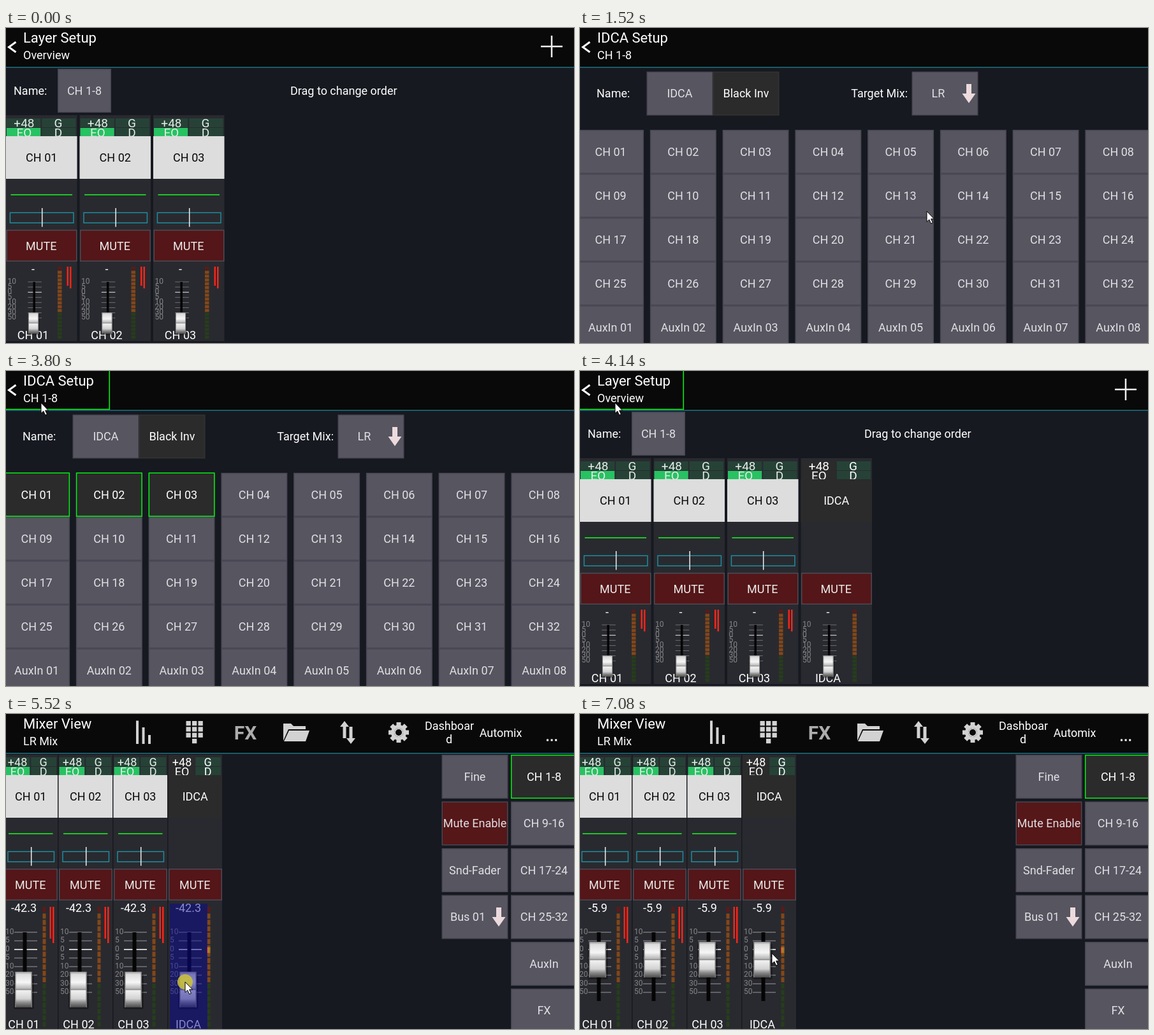
Write an HTML page that moves like this. It is 891x495 px and loops after 7.56 s.

```html
<!DOCTYPE html>
<html lang="en">
<head>
<meta charset="utf-8">
<title>Mixer layer setup</title>
<style>
  html, body { margin: 0; width: 100%; height: 100%; overflow: hidden; background: #161920; }
  svg { display: block; width: 891px; height: 495px; }
  text { font-family: Roboto, "Noto Sans", sans-serif; white-space: pre; }
</style>
</head>
<body>
<svg id="stage" viewBox="0 0 891 495" xmlns="http://www.w3.org/2000/svg"></svg>
<script>
const LOOP = 7560;
const GREEN = '#00f010', GREY = '#565560', EDGE = '#484753', DARK = '#2b2b2b';
const PALE = '#e0e0e4', ICON = '#d2d2d2';

// --- drawing helpers -------------------------------------------------
const rect = (x, y, w, h, fill, extra = '') =>
  `<rect x="${x}" y="${y}" width="${w}" height="${h}" fill="${fill}" ${extra}/>`;
const frame = (x, y, w, h, fill, stroke, sw = 1.5) =>
  rect(x + sw / 2, y + sw / 2, w - sw, h - sw, fill, `stroke="${stroke}" stroke-width="${sw}"`);
const path = (d, stroke, sw = 1, fill = 'none') =>
  `<path d="${d}" stroke="${stroke}" stroke-width="${sw}" fill="${fill}"/>`;
// y is the middle of the capitals
const text = (s, x, y, fill = '#fff', size = 18, anchor = 'middle', extra = '') =>
  `<text x="${x}" y="${y + size * 0.356}" font-size="${size}" fill="${fill}" text-anchor="${anchor}" ${extra}>${s}</text>`;
const group = (id, body, extra = '') => `<g id="${id}" ${extra}>${body}</g>`;
const range = n => [...Array(n).keys()];
const two = n => String(n).padStart(2, '0');

const button = (s, x, y, w, h, fill = GREY, color = PALE, dx = 0) =>
  frame(x, y, w, h, fill, fill === DARK ? '#333' : EDGE) + text(s, x + w / 2 + dx, y + h / 2, color);
const chosen = (s, x, y, w, h) =>
  frame(x, y, w, h, DARK, GREEN) + text(s, x + w / 2, y + h / 2);
const arrowDown = (x, y) =>
  `<path d="M${x - 4} ${y}h8v15h6.5L${x} ${y + 30}L${x - 10.5} ${y + 15}h6.5z" fill="#ecdadd"/>`;

const header = (title, sub, back) =>
  rect(0, 0, 891, 61, '#090909') + rect(0, 61, 891, 1.5, '#1b7080') +
  text(title, 27, 15.5, '#fff', 22, 'start') + text(sub, 27, 43, '#fff', 18, 'start') +
  (back ? path('M15.5 22L4.5 30L15.5 38', '#fff', 3) : '');

// --- channel strips --------------------------------------------------
const MIXER = { w: 84.5, top: 64, end: 495, dy: 0, fx: 33.5, fy: 343, s: 1, meter: 61, meterW: 5, meterY: 303, peak: 72, label: 488, cell: 18 };
const LAYER = { w: 111.5, top: 137, end: 492, dy: 74, fx: 44.5, fy: 399, s: 0.6, meter: 81, meterW: 6.5, meterY: 375, peak: 95.5, label: 483, cell: 19 };
const MARKS = [10, 5, 0, 5, 10, 20, 30, 50];

function knob() {
  return `<g class="knob">${rect(-18, 3, 32, 56, '#000', 'opacity=".3" rx="3"')}` +
    rect(-16, 0, 27, 56, 'url(#metal)', 'rx="1.5"') +
    rect(-16, 27, 27, 1.5, '#8c8c8c') + rect(-16, 0, 1.5, 56, '#777') + rect(9.5, 0, 1.5, 56, '#777') + '</g>';
}

function strip(name, x, g) {
  const dca = name === 'IDCA', half = g.w / 2, y = n => n + g.dy, cell = '#264237';
  const cells = [['+48', 0, 68, dca ? DARK : cell], ['G', 1, 68, cell],
                 ['EQ', 0, 83, dca ? DARK : '#27c262'], ['D', 1, 83, cell]];
  let out = rect(0, g.top, g.w, g.end - g.top, '#292a2f');
  for (const [s, col, cy, fill] of cells) {
    out += rect(col ? half + 0.5 : 1, y(cy), half - 2.5, 14, fill);
  }
  for (const [s, col, cy] of cells) {
    out += text(s, half * (col ? 1.47 : 0.51), y(cy === 68 ? 75.5 : 90.5), dca ? '#fff' : '#e4ece7', g.cell);
  }
  out += rect(0, y(96), g.w, 67, dca ? DARK : '#dcdddc') +
    text(name, half, y(130), dca ? '#fff' : '#080808');
  if (!dca) {
    out += rect(7.5, y(187.2), g.w - 15, 1.8, '#1fd42a') +
      frame(5.7, y(215.5), g.w - 10.5, 17.5, 'none', '#1f8c9f') +
      rect(half + 0.2, y(209), 1.5, 29.5, '#eee');
  }
  out += frame(0.5, y(243), g.w - 0.5, 50, '#541618', '#4b4a56') + text('MUTE', half - 0.5, y(269), '#eee');
  out += `<text class="level" x="${g.fx - 2}" y="${y(311.4)}" font-size="18" fill="#fff" text-anchor="middle">-</text>`;
  MARKS.forEach((m, i) => {
    out += text(m, 2.5, g.fy - 1.5 + i * 13.5 * g.s, '#858589', 12, 'start');
  });
  out += range(19).map(i => rect(g.meter, g.meterY + i * 10 * g.s + (i ? 0.5 : 0), g.meterW, 8 * g.s,
    i < 1 ? '#5a1a1b' : i < 12 ? '#834719' : '#263d1c')).join('');
  if (!dca) {
    out += rect(g.peak, g.meterY, 2.5, 50 * g.s, '#f5251a') + rect(g.peak + 4.5, g.meterY, 2.5, 57 * g.s, '#f5251a');
  }
  out += text(name, g.fx - 2, g.label);
  const ticks = range(8).map(i =>
    rect(-17, i * 13.5 - 0.8, 36, i === 2 ? 1.8 : 1.5, i === 2 ? '#ddd' : '#75757a')).join('');
  out += `<g transform="translate(${g.fx} ${g.fy}) scale(${g.s})">` + ticks +
    rect(-3.5, 0, 6, 108, '#050505') + `<g transform="translate(0 80)">${knob()}</g></g>`;
  return `<g transform="translate(${x} 0)">${out}</g>`;
}

// --- screens ---------------------------------------------------------
const layerHead = header('Layer Setup', 'Overview', true) + path('M839 29H873M856 12V46', '#eee', 2.5);

const layerBody = text('Name:', 12, 99, '#fff', 18, 'start') + button('CH 1-8', 81, 64, 84, 69) +
  text('Drag to change order', 446, 99, '#fff', 18, 'start') +
  range(3).map(i => strip('CH 0' + (i + 1), i * 115.5, LAYER)).join('') +
  group('added', strip('IDCA', 346.5, LAYER));

const colX = i => -3.9 + 113.75 * i;
const idca = header('IDCA Setup', 'CH 1-8', true) +
  text('Name:', 26, 103, '#fff', 18, 'start') +
  button('IDCA', 104.5, 68.5, 104, 69) + button('Black Inv', 208.5, 68.5, 104, 69, DARK, '#fff') +
  text('Target Mix:', 514, 103, '#fff', 18, 'end') +
  button('LR', 520.5, 68.5, 104, 69, GREY, PALE, -10.5) + arrowDown(610, 88) +
  range(40).map(i => button(i < 32 ? 'CH ' + two(i + 1) : 'AuxIn ' + two(i - 31),
    colX(i % 8), 160 + 69 * (i >> 3), 104, 69)).join('') +
  range(3).map(i => group('pick' + i, chosen('CH 0' + (i + 1), colX(i), 159.5, 104, 69.5))).join('');

function icons() {
  const bars = rect(204, 10.5, 4, 36.5, ICON) + rect(213.5, 21, 4, 26, ICON) + rect(223, 33, 4, 14, ICON);
  const pad = range(10).map(i => {
    const k = i === 9 ? 10 : i;
    return rect(282.5 + (k % 3) * 9.5, 11 + Math.floor(k / 3) * 9.3, 7.3, 7.3, ICON);
  }).join('');
  const folder = path('M435 42V15h12l4 4h19v5H443zM444 26h32l-6 17h-34z', 'none', 0, ICON);
  const swap = path('M531 11l7 9h-4.5v18h-5V20H524zM541 47l-7-9h4.5V20h5v18H548z', 'none', 0, ICON);
  const teeth = range(8).map(i => rect(612.5, 13, 7, 7, ICON, `transform="rotate(${i * 45} 616 29)"`)).join('');
  const gear = teeth + `<circle cx="616" cy="29" r="9.5" fill="#090909" stroke="${ICON}" stroke-width="5"/>` +
    `<circle cx="616" cy="29" r="6" fill="none" stroke="${ICON}" stroke-width="2"/>`;
  const dots = range(3).map(i => rect(848 + i * 6.6, 39.5, 3, 3, '#fff')).join('');
  return bars + pad + text('FX', 375.5, 29, '#adadad', 30, 'middle', 'font-weight="700"') + folder + swap + gear +
    text('Dashboar', 695.5, 19) + text('d', 695, 40) + text('Automix', 776, 30) + dots;
}

const rowY = i => 64 + 73.5 * i;
const mixer = header('Mixer View', 'LR Mix', false) + icons() +
  ['CH 01', 'CH 02', 'CH 03', 'IDCA'].map((n, i) => strip(n, -3.5 + 86 * i, MIXER)).join('') +
  group('hot', rect(316, 366.5, 5, 9, '#ff4a20')) +
  group('warm', rect(315.5, 366.5, 2.5, 9, '#ff5a22') + rect(318, 366.5, 2.5, 9, '#7f8a2a')) +
  group('touch', rect(257, 298, 59, 197, '#0a0896', 'opacity=".48"')) +
  button('Fine', 683.5, rowY(0), 104, 69) +
  button('Mute Enable', 683.5, rowY(1), 104, 69, '#561719') +
  button('Snd-Fader', 683.5, rowY(2), 104, 69) +
  button('Bus 01', 683.5, rowY(3), 104, 69, GREY, PALE, -11) + arrowDown(773, 304) +
  chosen('CH 1-8', 792, rowY(0), 104, 69) +
  ['CH 9-16', 'CH 17-24', 'CH 25-32', 'AuxIn', 'FX'].map((n, i) =>
    button(n, 792, rowY(i + 1), 104, 69)).join('');

const stops = [[0, '#8f8f8f'], [.07, '#dcdcdc'], [.3, '#f6f6f6'], [.48, '#b4b4b4'], [.54, '#f0f0f0'],
  [.76, '#d2d2d2'], [.86, '#8e8e8e'], [1, '#4a4a4a']];

document.getElementById('stage').innerHTML =
  `<defs><linearGradient id="metal" x1="0" x2="0" y1="0" y2="1">` +
  stops.map(([o, c]) => `<stop offset="${o}" stop-color="${c}"/>`).join('') + '</linearGradient></defs>' +
  rect(0, 0, 891, 495, '#161920') +
  group('layer', layerHead + group('layerBody', layerBody)) +
  group('idca', idca) + group('mixer', mixer) +
  group('tap', path('M162.3 0V60.3H0', GREEN, 1.6)) +
  group('pointer', '<circle id="press" r="12" fill="#cdc335" opacity=".85"/>' +
    path('M0 0V16.5L3.8 13L6.6 19.3L9.4 18L6.6 12H11.5Z', '#000', 1, '#fff'));

// --- motion ----------------------------------------------------------
// Times the picture is known to refresh; between them it steps every 80 ms.
const TICKS = [0, 140, 900, 1520, 1600, 1680, 2460, 3240, 3800, 4060, 4140, 4600, 5380, 5520, 5600,
  6140, 6460, 6550, 6920, 7000, 7080];
const POINTER = [[140, 720, 340], [580, 850, 34], [820, 856, 30], [980, 856, 30], [1520, 544, 288],
  [1680, 530, 282], [2140, 66, 196], [2460, 66, 196], [2700, 165, 195], [2860, 165, 195], [3060, 280, 194],
  [3240, 280, 194], [3640, 57, 52], [3800, 55, 50], [4600, 55, 50], [5300, 281, 439], [5380, 281, 439],
  [5520, 281, 421], [6080, 283, 402], [6460, 284, 382], [6760, 286, 374], [6840, 286, 374], [7080, 301, 376]];
const FADER = [[5380, 423], [5520, 405], [6080, 386], [6460, 366], [6760, 358]];
const DECIBEL = [[342, 10], [369, 0], [385, -5.9], [393, -8.8], [396, -10], [423, -30], [432, -42.3], [450, -90]];
const PRESSES = [[740, 820], [2220, 2300], [2780, 2860], [3080, 3160], [3720, 3800], [5300, 6920]];
const PICKS = [2220, 2780, 3080];

const $ = id => document.getElementById(id);
const show = (id, on) => { $(id).style.display = on ? '' : 'none'; };
const knobs = document.querySelectorAll('#mixer .knob');
const levels = document.querySelectorAll('#mixer .level');

function lerp(table, t, col = 1) {
  if (t <= table[0][0]) return table[0][col];
  const i = table.findIndex(r => r[0] > t);
  if (i < 0) return table[table.length - 1][col];
  const a = table[i - 1], b = table[i];
  return a[col] + (b[col] - a[col]) * (t - a[0]) / (b[0] - a[0]);
}

function snap(t) {
  const base = TICKS.filter(k => k <= t).pop();
  return base + Math.floor((t - base) / 80) * 80;
}

function render(now) {
  const t = snap(now % LOOP);
  const back = t >= 4060 && t < 4600;
  show('layer', t < 1060 || back);
  show('layerBody', t < 820 || back);
  show('added', back);
  show('idca', t >= 1060 && t < 4060);
  show('mixer', t >= 4600);
  PICKS.forEach((at, i) => show('pick' + i, t >= at));
  show('tap', t >= 3720 && t < 4600);
  show('hot', t < 5380);
  show('warm', t >= 5380);
  show('touch', t >= 5380 && t < 6920);

  const top = lerp(FADER, t);
  const value = top >= 422.9 ? '-' : lerp(DECIBEL, top + 27).toFixed(1);
  knobs.forEach(k => k.setAttribute('transform', `translate(0 ${top - 423})`));
  levels.forEach(l => { l.textContent = value; });

  show('pointer', t >= 140);
  show('press', PRESSES.some(([a, b]) => t >= a && t < b));
  $('pointer').setAttribute('transform',
    `translate(${Math.round(lerp(POINTER, t, 1))} ${Math.round(lerp(POINTER, t, 2))})`);
}

const start = performance.now();
(function tick() {
  render(performance.now() - start);
  requestAnimationFrame(tick);
})();
</script>
</body>
</html>
```
